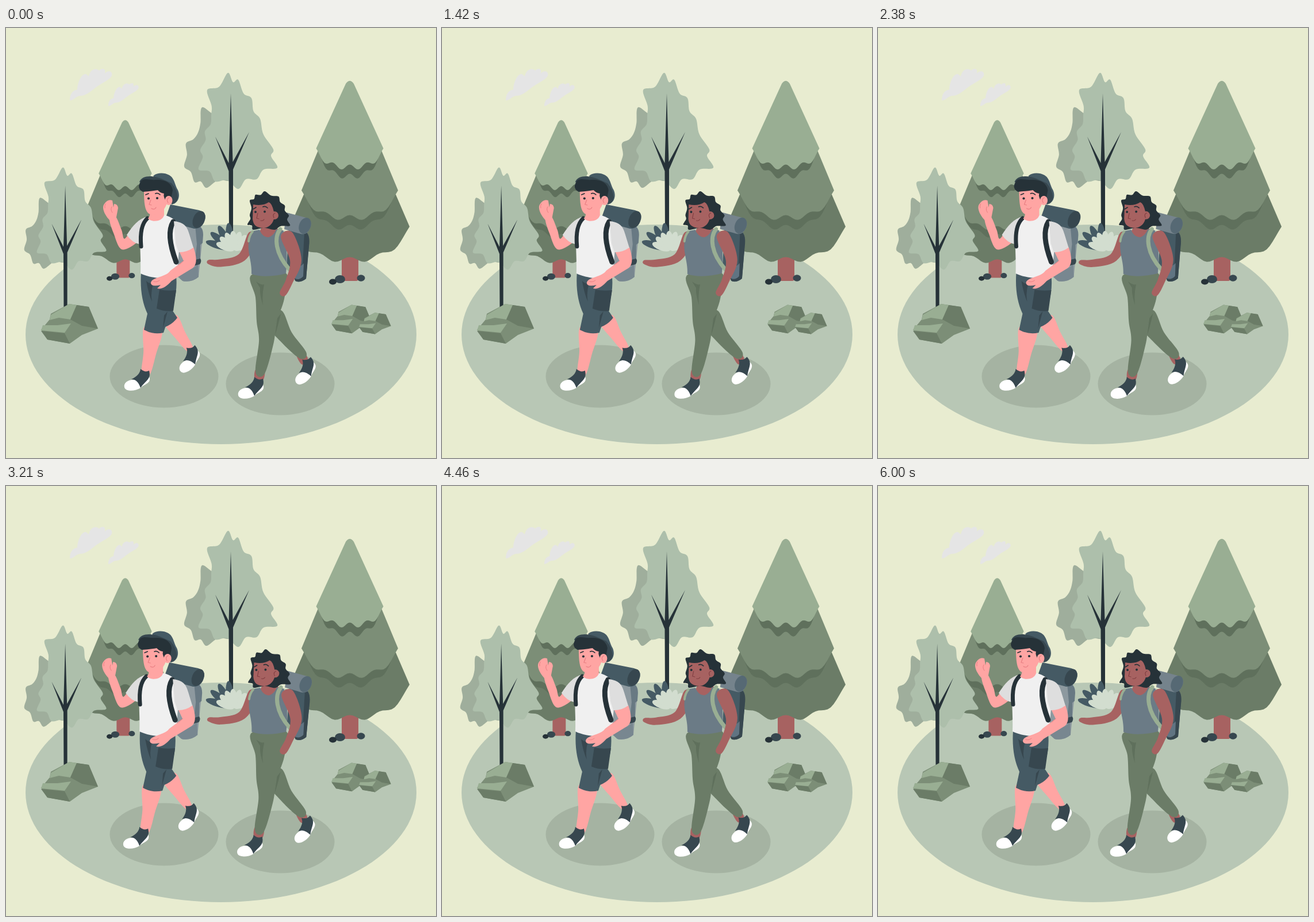
An HTML page that plays this animation: 748x748 px, repeating every 6.04 s.

```html
<!DOCTYPE html>
<html lang="en">
<head>
<meta charset="utf-8">
<title>Hikers</title>
<style>
html, body { margin: 0; width: 100%; height: 100%; overflow: hidden; background: #e8ecd0; }
svg { display: block; width: 100vw; height: 100vh; }
.ink { fill: #263238; }
.slate { fill: #37474f; }
.blue { fill: #455a64; }
.leaf1 { fill: #99ae93; }
.leaf2 { fill: #7c8e77; }
.leaf3 { fill: #6b7c67; }
.dim { fill: #5f705c; }
.pink { fill: #ffa5a3; }
.tan { fill: #a76261; }
.white { fill: #fff; }
.line { fill: none; stroke-linecap: round; stroke-linejoin: round; }
</style>
</head>
<body>
<svg viewBox="0 0 748 748">
<defs>
  <g id="tree">
    <path fill="#9fae9c" data-lobes="341,138 390,150 395,262 349,278 328,268 310,241 313,201 334,182"/>
    <path fill="#adbfab" data-lobes="386,78 404,90 427,122 442,158 465,211 472,243 436,263 404,280 364,267 335,246 338,212 346,180 357,151 350,108"/>
    <path class="ink" d="M391 114L394.5 233 423 181 395 246V354H388L387.5 249 364 189 387.5 235Z"/>
  </g>
  <g id="stump">
    <rect class="tan" x="584" y="385" width="29" height="55" rx="4"/>
    <ellipse class="slate" cx="581" cy="437" rx="9" ry="7"/>
    <ellipse class="ink" cx="568.5" cy="441.5" rx="6.5" ry="5"/>
    <ellipse class="slate" cx="617.5" cy="435" rx="7" ry="5.8"/>
  </g>
  <g id="fir"></g>
  <path id="cloud" fill="#e5e5e5" d="M111 126C111 117 114 109 124 107 124 96 131 79 139 80L144 84C146 74 154 68 162 74 167 69 174 70 172 79 179 72 186 76 184 83 182 89 168 95 158 102 145 112 139 118 128 118 121 119 118 126 111 126Z"/>
  <g id="rock">
    <path class="leaf2" d="M61 525L76 507 78 497 110 480 144 485 160 523 132 534 111 549 72 542Z"/>
    <path class="leaf1" d="M78 499L110 480 123 482 112 507 92 504 76 508ZM64 517L90 517 113 514 102 530 61 526Z"/>
    <path class="leaf3" d="M123 482L144 485 160 523 132 518 112 507ZM61 527L102 531 111 549 72 542Z"/>
  </g>
  <g id="shoe">
    <path class="white" d="M249 606C254 618 241 619 234 626 225 632 208 633 206 625 204 617 213 611 223 612Z"/>
    <path class="slate" d="M234 593Q242 600 249 596C253 611 243 613 234 626Q229 611 218 611 233 604 234 593Z"/>
  </g>
</defs>

<rect width="748" height="748" fill="#e8ecd0"/>
<use href="#cloud"/>
<use href="#cloud" transform="translate(98 45) scale(.72)"/>
<ellipse cx="374" cy="533" rx="340" ry="191" fill="#b8c7b5"/>
<ellipse cx="275" cy="606" rx="94.5" ry="54.5" fill="#a5b3a2"/>
<ellipse cx="477" cy="619" rx="94.5" ry="54.5" fill="#a5b3a2"/>

<use href="#stump" transform="translate(-269 87) scale(.79)"/>
<use href="#fir" transform="translate(-265 87.5) scale(.79)"/>
<use href="#stump"/>
<use href="#fir"/>
<use href="#tree"/>
<use href="#tree" transform="translate(-241 174) scale(.88)"/>
<g id="bush"></g>
<use href="#rock"/>
<use href="#rock" transform="translate(523 136) scale(.71 .72)"/>
<use href="#rock" transform="translate(580 236) scale(.56 .54)"/>

<g id="girl">
  <path class="blue" d="M492 348L522 354Q528 358 527 376L522 436Q514 443 505 441L488 418Z"/>
  <path class="slate" d="M519 355Q530 357 527 380L522 436Q512 444 503 440L498 420 516 414Z"/>
  <path fill="#607482" d="M500 418Q516 414 518 409L517 432Q510 440 501 435Z"/>
  <path fill="#75838c" d="M488 321L522 330Q535 336 529 348 524 361 512 358L484 350Z"/>
  <ellipse cx="520" cy="344" rx="10" ry="14.5" transform="rotate(22 520 344)" fill="#566974"/>

  <path class="tan" data-limb="510,562,13 520,582,13"/>
  <use href="#shoe" transform="translate(505 615) rotate(-28) translate(-207 -622)"/>
  <path class="tan" data-limb="442,594,15 440,612,14"/>
  <use href="#shoe" transform="translate(198 14)"/>

  <path class="leaf3" data-limb="464,500,34 487,537,25 517,570,15"/>
  <path class="leaf3" data-limb="457,428,60 459,470,50 453,512,34 453,545,26 442,600,16"/>
  <path class="dim" d="M435 441Q444 448 449 446 445 464 447 482 441 464 442 452ZM472 505L478 497Q472 523 468 534Z"/>

  <path class="tan" data-limb="431,360,19 410,399,15 373,409,13 352,407,7"/>
  <path class="tan" d="M445 338L466 330Q465 349 476 350L482 364 458 378 432 362Q446 354 445 338Z"/>
  <path fill="#6b7b86" d="M426 354L441 351Q446 364 457 364 466 361 470 350L482 352C489 370 490 405 487 427 468 432 444 434 427 428 428 405 420 394 422 372Z"/>
  <path class="line" stroke="#99ae93" stroke-width="7" d="M477 350C466 364 468 392 493 420"/>
  <path class="line" stroke="#99ae93" stroke-width="4" d="M429 354Q423 361 422 371"/>
  <path class="tan" data-limb="488,359,21 504,404,20 493,440,13 481,463,11"/>

  <path class="ink" data-lobes="450,284 474,293 485,309 492,326 494,344 467,351 430,351 420,342 424,325 424,300 434,290"/>
  <path class="tan" d="M430 307Q447 310 457 303 463 305 466 320C469 336 460 347 448 348 434 347 430 342 429 332Z"/>
  <circle class="tan" cx="467" cy="326" r="7"/>
  <path class="line" stroke="#823f42" stroke-width="1.2" d="M468 322Q463 324 466 330M438 322L436 331 440 332M443 335Q447 336 449 333"/>
  <path class="line" stroke="#263238" stroke-width="1.7" d="M430 315L435 312M447 311Q451 309 455 313"/>
  <circle class="ink" cx="434" cy="320" r="2"/>
  <circle class="ink" cx="450" cy="319.5" r="2"/>
</g>

<g id="boy">
  <path fill="#8d999f" d="M299 339L335 343Q343 347 342 364L335 433Q324 442 309 441L294 426Z"/>
  <path fill="#687983" d="M329 343Q343 343 343 360L342 374 338 377V408L328 412 332 376Z"/>
  <path fill="#788790" d="M301 421Q322 424 334 411L335 433Q324 443 307 440L296 430Z"/>
  <path class="slate" d="M326 404L338 401Q341 406 337 411L326 414Z"/>
  <path class="blue" d="M286 307L336 317Q350 321 346 334 341 350 327 349L276 335Z"/>
  <ellipse class="slate" cx="335.5" cy="333" rx="10" ry="15.5" transform="rotate(24 335 333)"/>

  <path class="pink" data-limb="286,506,25 303,534,20 321,560,11"/>
  <use href="#shoe" transform="translate(303.5 594.5) rotate(-28) translate(-207 -622)"/>
  <path class="pink" data-limb="256,522,31 250,566,22 243,602,14"/>
  <use href="#shoe"/>

  <path class="blue" d="M270 485L286 486 298 504Q290 515 277 520L262 515Z"/>
  <path class="blue" d="M235 426L296 431C300 470 284 497 274 530Q256 534 240 525L246 497C237 478 233 454 235 426Z"/>
  <path class="slate" d="M267 455Q280 458 296 456L291 492Q276 494 262 488Z"/>
  <path class="slate" d="M244 440Q250 446 256 445 251 460 254 476 248 463 244 440ZM275 500L281 493Q276 511 273 523Z"/>

  <path class="pink" data-limb="225,361,20 204,376,19 194,354,15 185,329,11"/>
  <path class="pink" d="M181 335C174 328 165 314 171 306Q177 297 185 300L187 312 188 306Q194 306 195 313L191 334Z"/>
  <path class="line" stroke="#e87f83" stroke-width="1" d="M173 306Q171 309 172 313M184 311Q181 316 185 321"/>
  <path fill="#dedede" d="M247 328C231 331 220 344 210 360Q220 374 232 376L240 356Z"/>
  <path fill="#f0f0f0" d="M243 329Q259 334 274 325C289 328 301 337 304 352L297 433C278 439 248 434 234 427 235 399 232 377 234 356Z"/>
  <path class="line" stroke="#263238" stroke-width="7" d="M246 331C235 341 233 358 235 380"/>
  <path class="line" stroke="#263238" stroke-width="9" d="M291 337C281 353 285 378 296 407"/>

  <path class="pink" d="M300 386L326 381C332 398 333 412 324 418L288 440C279 450 271 455 263 453L269 447Q252 451 252 443C254 433 278 434 286 422L309 405Z"/>
  <path class="line" stroke="#e87f83" stroke-width="1" d="M302 411L309 405M257 441Q262 443 267 439"/>
  <path fill="#dedede" d="M292 336C310 338 315 345 319 359L326 382Q313 391 300 390L295 374Z"/>

  <path class="pink" d="M250 315L275 303V326C271 338 252 338 247 331Q252 327 250 315Z"/>
  <path class="blue" d="M256 258C260 251 279 250 288 259 294 266 294 274 299 282 304 293 299 306 288 307L280 275Z"/>
  <path class="slate" d="M232 268C236 256 255 256 270 262L288 270Q298 281 299 295 297 306 288 306L277 282Z"/>
  <path class="pink" d="M240 281Q258 283 270 278L282 290C282 314 269 325 255 325 242 324 240 309 240 281Z"/>
  <path class="ink" d="M235 266C240 260 251 265 261 264 276 263 288 269 290 282L287 298 278 301Q273 292 275 288 268 287 264 282 252 284 238 285 226 279 235 266Z"/>
  <ellipse class="pink" cx="283" cy="300" rx="6.5" ry="8"/>
  <path class="line" stroke="#e87f83" stroke-width="1.2" d="M284 295Q278 298 282 304M252 299L249 307 253 308M253 314Q259 317 261 312"/>
  <path class="line" stroke="#263238" stroke-width="1.7" d="M243 290L248 288M260 288Q264 286 268 290"/>
  <circle class="ink" cx="248" cy="296.5" r="2.1"/>
  <circle class="ink" cx="263" cy="296" r="2.1"/>
</g>
</svg>
<script>
const $ = id => document.getElementById(id);
const points = text => text.split(' ').map(p => p.split(',').map(Number));
const mix = (a, b, k) => a.map((v, i) => v + (b[i] - v) * k);

// Closed smooth curve through the points
function curve(pts) {
  const at = i => pts[(i + pts.length) % pts.length];
  return 'M' + pts[0] + pts.map((p, i) => {
    const a = at(i - 1), b = at(i + 1), c = at(i + 2);
    const c1 = p.map((v, k) => v + (b[k] - a[k]) / 6);
    const c2 = b.map((v, k) => v - (c[k] - p[k]) / 6);
    return `C${c1} ${c2} ${b}`;
  }).join('') + 'Z';
}

// Scalloped blob: between two tips the edge sinks towards the middle
function lobes(tips, sink = .1) {
  const mid = [0, 1].map(k => tips.reduce((s, p) => s + p[k], 0) / tips.length);
  return curve(tips.flatMap((p, i) => {
    const next = tips[(i + 1) % tips.length];
    return [p, mix(mix(p, next, .5), mid, sink)];
  }));
}

// Tapered limb along joints of x, y and width
function limb(joints) {
  const side = sign => joints.map(([x, y, w], i) => {
    const a = joints[Math.max(0, i - 1)], b = joints[Math.min(joints.length - 1, i + 1)];
    const dx = b[0] - a[0], dy = b[1] - a[1], k = sign * w / 2 / Math.hypot(dx, dy);
    return [x + dy * k, y - dx * k];
  });
  return curve([...side(1), ...side(-1).reverse()]);
}

for (const el of document.querySelectorAll('[data-lobes]')) el.setAttribute('d', lobes(points(el.dataset.lobes)));
for (const el of document.querySelectorAll('[data-limb]')) el.setAttribute('d', limb(points(el.dataset.limb)));

// One skirt of the fir: straight sides, sagging hem with four waves
function skirt(cls, topHalf, top, half, y, sag) {
  let d = `M${598 - topHalf} ${top}Q598 ${top - 10} ${598 + topHalf} ${top}`;
  for (let u = 1; u > -1.01; u -= .05) {
    const hem = y + sag * (1 - Math.abs(u) ** 3) - 4.5 * Math.cos(4 * Math.PI * u);
    d += `L${598 + half * u} ${hem}`;
  }
  return `<path class="${cls}" d="${d}Z"/>`;
}
$('fir').innerHTML =
  skirt('leaf3', 78, 285, 104, 350, 53) +
  skirt('dim', 70, 270, 80, 290, 57) +
  skirt('leaf2', 53, 208, 84, 287, 43) +
  skirt('dim', 45, 190, 55, 216, 42) +
  skirt('leaf1', 7, 97, 58.5, 214, 28);

// Petals fanned out around a base point
function fan(x, y, color, count, from, to, size) {
  let out = '';
  for (let i = 0; i < count; i++) {
    const deg = from + (to - from) * i / (count - 1);
    out += `<ellipse cx="${x + size / 2}" cy="${y}" rx="${size / 2}" ry="6.5" fill="${color}" transform="rotate(${deg} ${x} ${y})"/>`;
  }
  return out;
}
$('bush').innerHTML = fan(391, 384, '#455a64', 4, -164, -95, 45) + fan(397, 386, '#d2ddcf', 7, -160, -28, 33);

const LOOP = 6040, FPS = 24, LAST = 144;
const SCALE = 748 / 500;
const shakeKeys = [0, -1, 2, -4, 4, -4, 4, -4, 2, -1, 0];

function shake(p) {
  const i = Math.min(9, Math.floor(p * 10));
  return shakeKeys[i] + (shakeKeys[i + 1] - shakeKeys[i]) * (p * 10 - i);
}
const triangle = p => Math.asin(Math.sin(2 * Math.PI * p)) * 2 / Math.PI;

const start = performance.now();
function draw() {
  const t = (performance.now() - start) % LOOP;
  const sec = Math.min(LAST, Math.floor((t + 5) * FPS / 1000)) / FPS;
  $('boy').setAttribute('transform', `translate(${shake(sec / 6) * SCALE} 0)`);
  $('girl').setAttribute('transform', `rotate(${triangle(sec / 1.5)} 442.5 465.5)`);
  requestAnimationFrame(draw);
}
draw();
</script>
</body>
</html>
```
